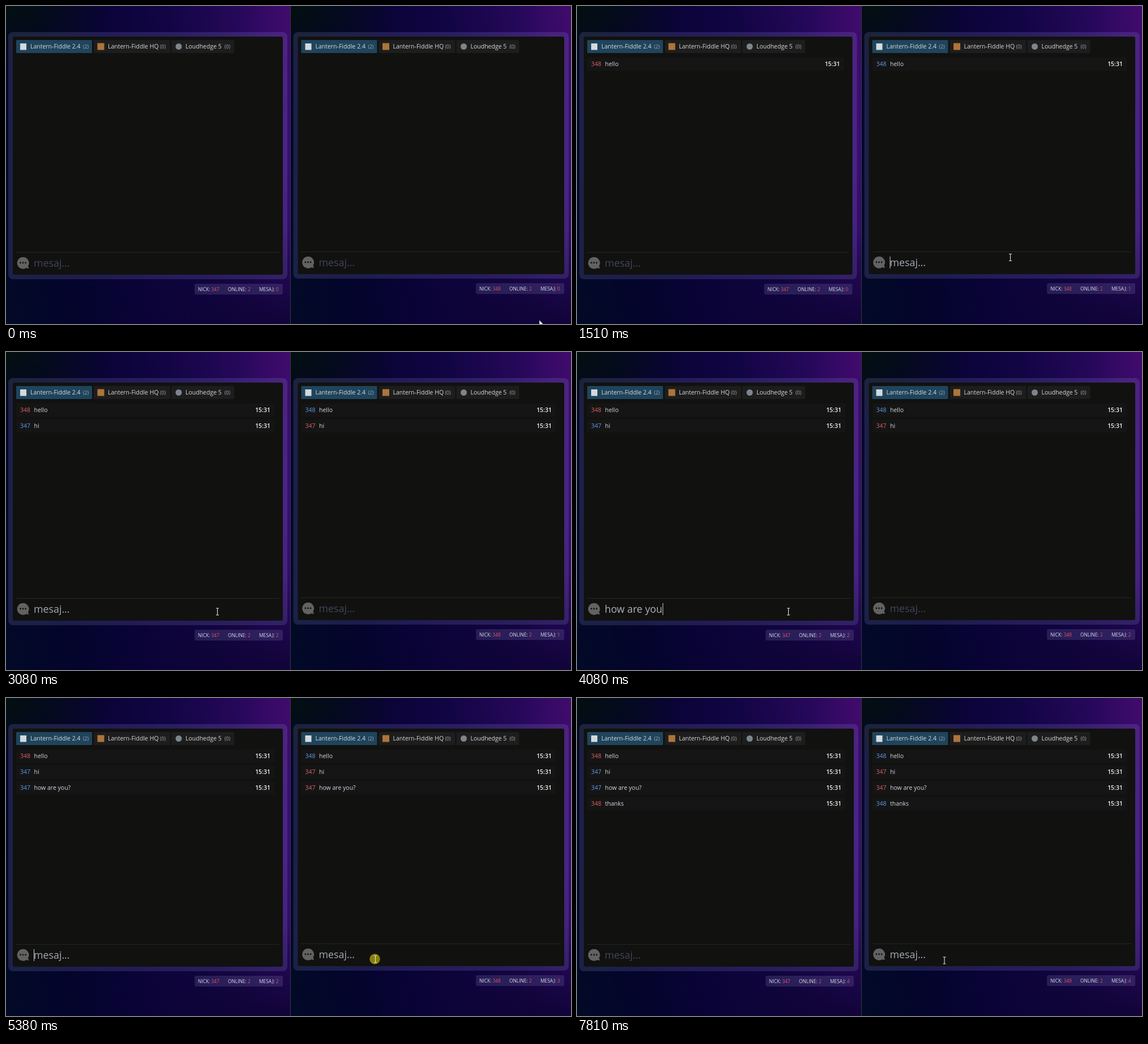
An HTML page that plays this animation: 998x561 px, repeating every 8000 ms.

```html
<!DOCTYPE html>
<html lang="tr">
<head>
<meta charset="utf-8">
<title>Chat</title>
<style>
  html, body { margin: 0; width: 998px; height: 561px; overflow: hidden; background: #05032a; }
  .half {
    position: absolute; top: 0; height: 561px; width: 502px;
    background:
      radial-gradient(ellipse 190px 130px at 0 0, #030f10, #030f1000),
      radial-gradient(ellipse 330px 210px at 95% 108%, #0b0330, #0b033000),
      radial-gradient(ellipse 130px 300px at 100% 45%, #3c128088, #3c128000),
      linear-gradient(82deg, #020a26 0%, #04042c 22%, #0a0338 42%, #120544 62%, #26085a 84%, #420a6a 100%);
  }
  .half + .half { left: 503px; width: 495px; }
  .rule { position: absolute; left: 502px; width: 1px; height: 561px; background: #343840; }
  svg { position: absolute; left: 0; top: 0; }
  text { font-family: "Open Sans", "Noto Sans", sans-serif; font-size: 10.5px; fill: #d6d8da; white-space: pre; }
  .count { font-size: 8.6px; fill: #a3a9b3; }
  .time { font-weight: 600; fill: #f4f4f4; text-anchor: end; }
  .stat { font-size: 8.4px; fill: #dcdaea; }
  .value { fill: #e2505c; }
  .entry { font-size: 17.8px; }
</style>
</head>
<body>
<div class="half"></div>
<div class="half"></div>
<div class="rule"></div>
<svg id="stage" width="998" height="561" viewBox="0 0 998 561"></svg>
<script>
const LOOP = 8000, BLINK = 530;
const stage = document.getElementById('stage');

function add(parent, tag, attrs = {}, text) {
  const el = document.createElementNS('http://www.w3.org/2000/svg', tag);
  set(el, attrs);
  if (text !== undefined) el.textContent = text;
  parent.appendChild(el);
  return el;
}
function set(el, attrs) {
  for (const k in attrs) el.setAttribute(k, attrs[k]);
}
const show = (el, on) => el.setAttribute('visibility', on ? 'visible' : 'hidden');

const LEFT = 0, RIGHT = 1;
const NICKS = ['347', '348'];

// seen / counted: moments for the left and the right window
const messages = [
  { from: RIGHT, text: 'hello', keys: [760, 850, 960, 1060, 1150], sent: 1250, seen: [1420, 1330], counted: [1540, 1480] },
  { from: LEFT, text: 'hi', keys: [2300, 2550], sent: 2650, seen: [2880, 2980], counted: [3080, 3330] },
  { from: LEFT, text: 'how are you?', keys: [3180, ...Array.from({ length: 10 }, (_, i) => 3400 + i * 75.5), 4380],
    sent: 4540, seen: [4770, 4870], counted: [5500, 5100] },
  { from: RIGHT, text: 'thanks', keys: [5560, 5720, 5830, 5940, 6050, 6240], sent: 6830, seen: [7030, 6930], counted: [7280, 7410] },
];

const focusSpans = [[[1990, 5400]], [[370, 1990], [5340, LOOP]]];
const narrow = t => t >= 1420 && t < 2880;

const tabs = [
  { x: 18, w: 134, name: 'Lantern-Fiddle 2.4', label: 43, count: '(2)', countX: 136, fill: '#1f445c' },
  { x: 155, w: 135, name: 'Lantern-Fiddle HQ', label: 180, count: '(0)', countX: 272, fill: '#1d1d1d' },
  { x: 292, w: 111, name: 'Loudhedge 5', label: 317, count: '(0)', countX: 386, fill: '#1d1d1d' },
];

function makePanel(side) {
  const dy = side === LEFT ? 0 : -1;
  const g = add(stage, 'g', { transform: `translate(${side * 503.5} 0)` });
  const outer = add(g, 'rect', { x: 4, y: 46, height: 436 + dy, rx: 8, fill: '#8c8cd2', 'fill-opacity': .19 });
  const inner = add(g, 'rect', { x: 12, y: 54, height: 420 + dy, rx: 3, fill: '#111110' });

  for (const tab of tabs) {
    add(g, 'rect', { x: tab.x, y: 60, width: tab.w, height: 23, rx: 1, fill: tab.fill });
    add(g, 'text', { x: tab.label, y: 75 }, tab.name);
    add(g, 'text', { x: tab.countX, y: 74.6, class: 'count' }, tab.count);
  }
  add(g, 'rect', { x: 25, y: 66, width: 11, height: 11.5, fill: '#d3d9dc' });
  add(g, 'rect', { x: 161.5, y: 65.5, width: 12, height: 12, fill: '#ad753a' });
  add(g, 'circle', { cx: 305, cy: 71.5, r: 5.5, fill: '#7d858c' });

  const rows = messages.map((m, i) => {
    const row = add(g, 'g', { transform: `translate(0 ${i * 28})` });
    const back = add(row, 'rect', { x: 18, y: 91, height: 23, rx: 2, fill: '#151516' });
    add(row, 'text', { x: 25, y: 106, style: `fill:${m.from === side ? '#5c9be2' : '#e0605c'}` }, NICKS[m.from]);
    add(row, 'text', { x: 49.5, y: 106 }, m.text);
    const time = add(row, 'text', { y: 106, class: 'time' }, '15:31');
    return { row, back, time };
  });

  const foot = add(g, 'g', { transform: `translate(0 ${dy})` });
  const line = add(foot, 'rect', { x: 18, y: 434, height: 1, fill: '#252525' });
  add(foot, 'path', { d: 'M30 443a10.4 10.4 0 1 0 5.6 19.2l5 .8-1.6-4.2A10.4 10.4 0 0 0 30 443z', fill: '#626262' });
  for (const x of [25.4, 30, 34.6]) add(foot, 'circle', { cx: x, cy: 453, r: 1.4, fill: '#111110' });
  const entry = add(foot, 'text', { x: 49, y: 460, class: 'entry' });
  const caret = add(foot, 'rect', { y: 443, width: 1, height: 21, fill: '#c8ccd2' });

  const stats = add(g, 'g');
  add(stats, 'rect', { x: -156, y: 490, width: 156, height: 19, rx: 3, fill: '#a0a0d8', 'fill-opacity': .17 });
  const [, , total] = [[-150, 'NICK: ', NICKS[side]], [-97, 'ONLINE: ', '2'], [-42, 'MESAJ: ', '0']].map(([x, label, value]) => {
    const text = add(stats, 'text', { x, y: 502.8, class: 'stat' }, label);
    return add(text, 'tspan', { class: 'value' }, value);
  });

  function layout(t) {
    const edge = side === RIGHT ? 482.5 : narrow(t) ? 486.5 : 489;
    set(outer, { width: edge + 4 });
    set(inner, { width: edge - 12 });
    set(line, { width: edge - 24 });
    set(stats, { transform: `translate(${edge} ${dy})` });
    rows.forEach(({ row, back, time }, i) => {
      set(back, { width: edge - 33 });
      set(time, { x: edge - 22 });
      show(row, t >= messages[i].seen[side]);
    });
  }

  function input(t) {
    const span = focusSpans[side].find(([a, b]) => t >= a && t < b);
    let typed = '', anchor = span ? span[0] : 0;
    for (const m of messages) {
      if (m.from !== side) continue;
      const past = m.keys.filter(k => k <= t);
      if (past.length) anchor = Math.max(anchor, past[past.length - 1] - 60);
      if (t < m.sent) typed += m.text.slice(0, past.length);
    }
    entry.textContent = typed || 'mesaj...';
    entry.style.fill = typed ? '#adb1ba' : span ? '#a2a8b2' : '#40455a';
    const on = span && t >= span[0] + 60 && Math.floor((t - anchor) / BLINK) % 2 === 0;
    set(caret, { x: typed ? 49.5 + entry.getComputedTextLength() : 49 });
    show(caret, on);
  }

  return t => {
    layout(t);
    input(t);
    total.textContent = messages.filter(m => t >= m.counted[side]).length;
  };
}

const panels = [makePanel(LEFT), makePanel(RIGHT)];

const pointer = add(stage, 'g');
const halo = add(pointer, 'circle', { r: 9.3, cx: -1, fill: '#918708', 'fill-opacity': .95 });
const arrow = add(pointer, 'path', { d: 'M0 0V13l3-2.7 2 4.7 2-.9-2-4.5h4z', fill: '#fff', stroke: '#111', 'stroke-width': .5 });
const beam = add(pointer, 'path', { d: 'M-2.5-6H-.7L0-5.4.7-6H2.5M0-5.4V5.4M-2.5 6H-.7L0 5.4.7 6H2.5', fill: 'none', stroke: '#e4e4e4', 'stroke-width': 1.1 });

const moves = [
  { from: 30, to: 360, a: [942, 554], b: [765.5, 443.5] },
  { from: 1660, to: 1970, a: [765.5, 443.5], b: [373.5, 458] },
  { from: 4980, to: 5330, a: [373.5, 458], b: [652.5, 460.5] },
  { from: 5440, to: 5560, a: [652.5, 460.5], b: [649, 463] },
];
const clicks = [[350, 410], [1970, 2090], [5340, 5450]];

function drawPointer(t) {
  const m = moves.filter(m => t >= m.from).pop() || moves[0];
  const p = Math.min(1, Math.max(0, (t - m.from) / (m.to - m.from)));
  const e = p * p * (3 - 2 * p);
  const [x, y] = m.a.map((v, i) => v + (m.b[i] - v) * e);
  const overInput = y > 434 && y < 472 && ((x > 49 && x < 482) || (x > 553 && x < 980));
  set(pointer, { transform: `translate(${x} ${y})` });
  show(beam, overInput);
  show(arrow, !overInput);
  show(halo, clicks.some(([a, b]) => t >= a && t < b));
}

const start = performance.now();
function frame() {
  const t = (performance.now() - start) % LOOP;
  panels.forEach(draw => draw(t));
  drawPointer(t);
  requestAnimationFrame(frame);
}
frame();
</script>
</body>
</html>
```
